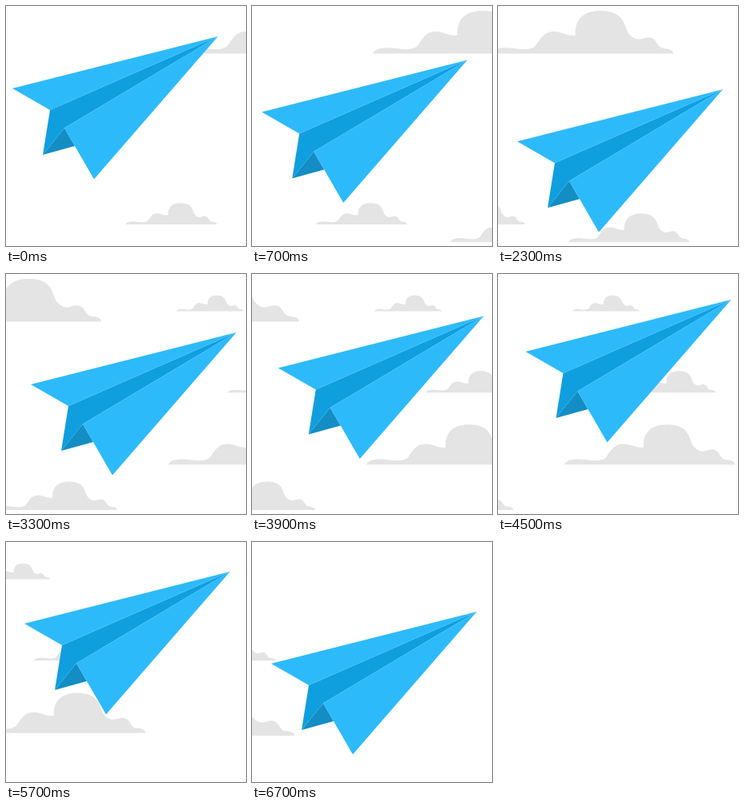
An HTML page that plays this animation: 300 by 300 pixels, repeating every 6.8 s.

```html
<!DOCTYPE html>
<html lang="en">
<head>
<meta charset="utf-8">
<title>Paper plane</title>
<style>
  html, body { margin: 0; width: 100%; height: 100%; overflow: hidden; background: #fff; }
  svg { display: block; width: 100%; height: 100%; }
</style>
</head>
<body>
<svg viewBox="0 0 300 300">
  <defs>
    <path id="cloud" d="M0,0C2,-6 12,-8 24,-7C40,-5 50,-4 56,-10C64,-22 68,-28 80,-27.5
      C90,-27 94,-22 106,-23C104,-42 116,-53.5 136,-53.5C158,-53.5 165,-46 170,-29
      C173,-22 180,-17 187,-18C194,-20 198,-22 204,-18C210,-12 209,-7 217,-6.5C224,-6 228,-4 228,0Z"/>
  </defs>
  <g id="sky" fill="#e4e4e4"></g>
  <!-- the nose is the origin -->
  <g id="plane">
    <path fill="#148dc4" d="M-219,148L-192,114.5L-179,137Z"/>
    <path fill="#0f9fdf" d="M0,0L-210,92L-219,148L-192,114.5Z"/>
    <path fill="#2dbafb" d="M0,0L-257,65L-210,92ZM0,0L-192,114.5L-155,178.5Z"/>
  </g>
</svg>
<script>
const LOOP = 6800, STEP = 200;
const SPEED = 0.1, BOOST = 0.021, BOOST_START = 5600;

// x at the start, baseline y, scale, late sink in px
const clouds = [
  [221, 59.5, 1, 0],
  [149.7, 273, 0.5, 0],
  [318, 295, 0.662, 0],
  [543, 46.5, 0.368, 0],
  [607, 148.3, 0.505, 0],
  [533, 238.3, 0.935, 4],
].map(([x, y, scale, sink]) => {
  const node = document.createElementNS("http://www.w3.org/2000/svg", "use");
  node.setAttribute("href", "#cloud");
  document.getElementById("sky").append(node);
  return { node, x, y, scale, sink };
});

// time, nose x, nose y
const route = [
  [0, 265, 38], [1500, 274, 101], [1900, 277.5, 118.5], [2300, 281, 104.3],
  [3300, 288, 73], [4500, 291.5, 32], [5100, 292.4, 9.5], [5700, 280, 37], [6700, 281, 87],
];
const plane = document.getElementById("plane");

function noseAt(t) {
  const i = Math.max(1, route.findIndex(key => key[0] >= t));
  const [t0, x0, y0] = route[i - 1], [t1, x1, y1] = route[i];
  const p = (t - t0) / (t1 - t0);
  return [x0 + (x1 - x0) * p, y0 + (y1 - y0) * p];
}

function draw(t) {
  const late = Math.max(0, t - BOOST_START);
  const drift = t * SPEED + late * BOOST;
  for (const { node, x, y, scale, sink } of clouds) {
    const drop = sink * late / (6700 - BOOST_START);
    node.setAttribute("transform", `translate(${x - drift} ${y + drop}) scale(${scale})`);
  }
  plane.setAttribute("transform", `translate(${noseAt(t)})`);
}

function tick() {
  const t = performance.now() % LOOP;
  // the picture holds between steps
  draw(Math.max(0, Math.floor((t + STEP / 2) / STEP) * STEP - STEP / 2));
  requestAnimationFrame(tick);
}
tick();
</script>
</body>
</html>
```
